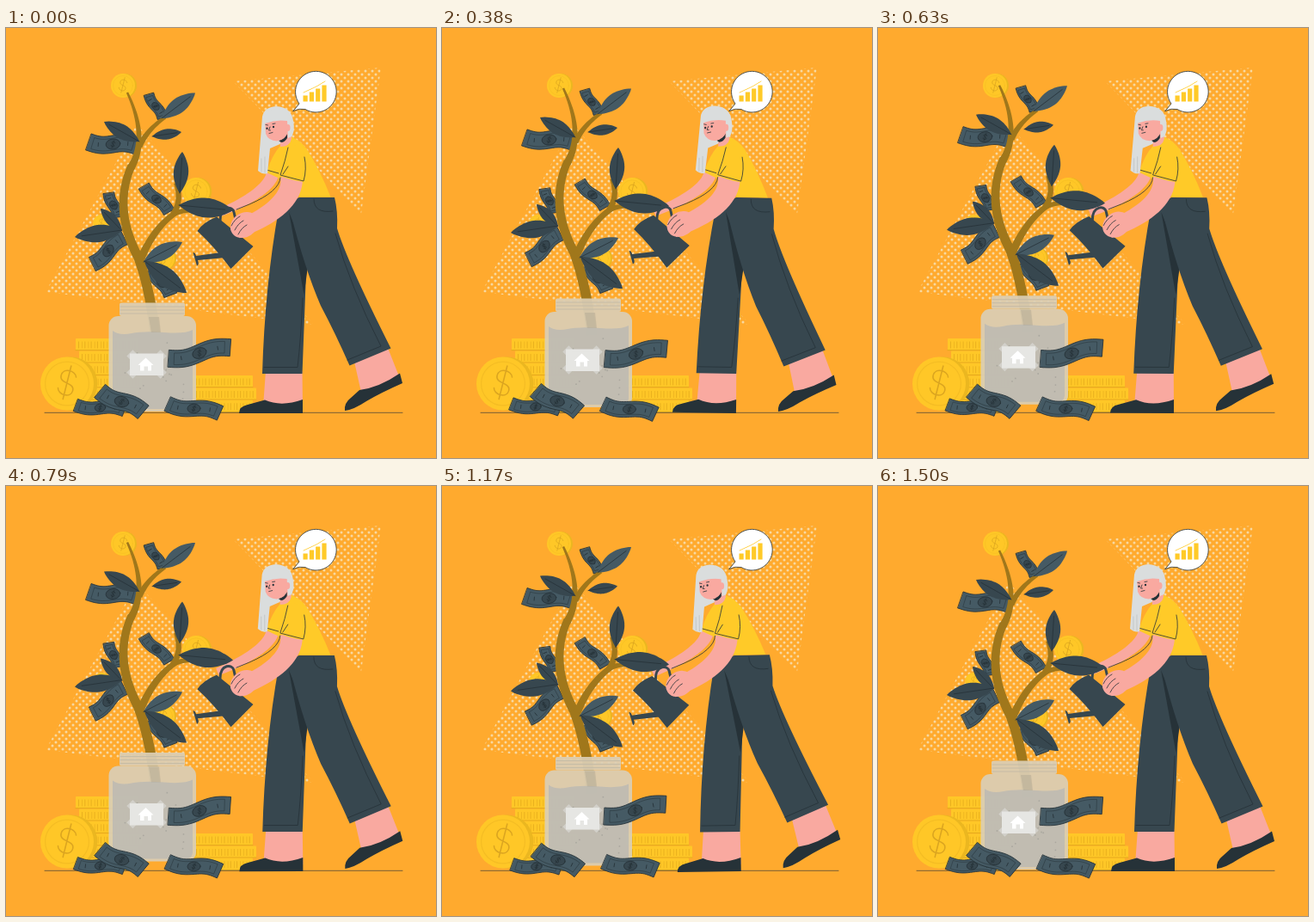
An HTML page that plays this animation: 500 by 500 pixels, repeating every 1540 ms.

```html
<!DOCTYPE html>
<html lang="en">
<head>
<meta charset="utf-8">
<title>Money tree</title>
<style>
html, body { margin: 0; width: 100%; height: 100%; overflow: hidden; background: #ffaa2e; }
svg { display: block; width: 100vw; height: 100vh; }
.pink { fill: #f9a9a0; }
.yellow { fill: #ffca28; }
.slate { fill: #37474f; }
.ink { fill: #263238; }
.hair { fill: #dadddd; }
.line { stroke: #263238; stroke-width: .8; }
</style>
</head>
<body>
<svg viewBox="0 0 500 500" fill="none" stroke-linecap="round" stroke-linejoin="round">
  <defs>
    <pattern id="dots" width="8" height="8" patternUnits="userSpaceOnUse">
      <g fill="#f8d8a0"><circle cx="2" cy="2" r="1.5"/><circle cx="6" cy="6" r="1.5"/></g>
    </pattern>
  </defs>
  <path fill="url(#dots)" d="M264 62L436 46L413 216ZM152 112L46 307L358 345Z"/>
  <g id="coins"></g>
  <path class="line" d="M45 447.300H461" opacity=".8"/>

  <g id="bubble">
    <path d="M334 96.500L341 88A23.800 23.800 0 1 1 348 94.500Q341 93 334 96.500Z" fill="#fff" class="line"/>
    <path d="M346 75L361 68L371 62" stroke="#ffca28" stroke-width=".8"/>
  </g>

  <g id="woman">
    <g id="backArm"></g>
    <!-- watering can -->
    <path class="slate" d="M217.500 261Q220 261 221 265L250 261L255 267L223 270Q225 275 222 276.500Z"/>
    <path stroke="#37474f" stroke-width="3" d="M249 224C249 206 264 207 265 214T270 236"/>
    <path class="slate" d="M222.500 236Q229 226 245 219.500L287.500 254L261.500 280Q242 254 222.500 236Z"/>

    <!-- legs -->
    <path class="pink" d="M302 399H344.500L345 440H299ZM405 388L444 372L457 405L414 428Z"/>
    <path class="ink" d="M271 448Q271 440 281 438L301 432.500Q320 441 345 432V448ZM394 445Q393 436 401 430L411 421Q434 418 458 401.500L461 413Q436 424 419 434Q404 444 394 445Z"/>
    <path class="slate" d="M325 200H360L349 284L344.500 402H298Q301 300 317 211Z"/>
    <path class="ink" d="M329 214L352 270L346.500 310Q337 258 329 214Z"/>
    <path class="slate" d="M327 203L341 197H382Q386 213 385 233Q396 270 447.500 372.500L399.500 392.500Q383 355 366 323Q347 279 331 215Z"/>
    <path class="line" d="M300 394.500H339Q343 360 345 314M397 386L436 370Q400 300 383 239M358 199Q358 216 380 213"/>

    <!-- shirt -->
    <path class="yellow" d="M319 137L332 127Q342 130 350 141Q366 167 377.500 196.500H341L335 183L303 168Q309 148 319 137Z"/>
    <g id="frontArm"></g>
    <path class="yellow" d="M327 136Q341 133 347 147Q350 161 346 179Q330 177 319 172Z"/>
    <path class="line" d="M328 139Q325 154 319 171L346 178Q350 164 347 150M303 165L317 169M322 170L328 161"/>

    <!-- head -->
    <path class="hair" d="M298 103Q300 92 314 91Q332 92 334 108Q337 121 330 130L307 140L304 169Q299 171 293 166Z"/>
    <path class="pink" d="M318 116H330L332 129Q330 138 319 138Z"/>
    <path class="ink" d="M317 131Q325 128 327 123V128Q324 133 320 133Z"/>
    <path class="pink" d="M301 107H328V119Q326 130 315 131.500Q305 131 302 123Z"/>
    <path class="hair" d="M298 112Q299 94 315 94Q330 95 333 108L332 126L328 128L327 108Q314 106 301 111Z"/>
    <ellipse class="pink" cx="328" cy="116" rx="2.500" ry="4"/>
    <path class="line" d="M302 112.500L304.500 113M310 111.500L313 111M307 115L305.500 119H307.500M306 122.500L310 121.500"/>
    <path class="line" stroke-width="2.200" style="stroke-width:2.200" d="M303.500 116.500v.4M311 114.800v.4"/>
    <path stroke="#b9bebe" stroke-width=".7" d="M297 152V167M301 150V168"/>
  </g>

  <g id="plant">
    <g id="tree"></g>
    <g id="jar">
      <g fill="#dbcfb6" fill-opacity=".92">
        <rect x="132" y="319.500" width="76" height="15.500" rx="2"/>
        <rect x="119.500" y="335" width="101.500" height="111" rx="11"/>
      </g>
      <path fill="#bdbab3" fill-opacity=".85" d="M124 352Q132 358 146 355T184 354T217 351V436Q216 443 209 443H132Q124 443 124 436Z"/>
      <path fill="#9c9583" fill-opacity=".3" d="M166 336H178L180 354H169Z"/>
      <path stroke="#c5bba6" d="M133 324H207M133 328H207M133 332H207"/>
    </g>
  </g>
  <g id="cash"></g>
</svg>
<script>
const $ = id => document.getElementById(id);
const add = (id, markup) => $(id).insertAdjacentHTML('beforeend', markup);

const bend = (x0, y0, cx, cy, x1, y1) => t => {
  const s = 1 - t;
  return [s * s * x0 + 2 * s * t * cx + t * t * x1, s * s * y0 + 2 * s * t * cy + t * t * y1];
};

// Outline of a band that follows a curve with a varying width.
function ribbon(curve, width, from = 0, to = 1) {
  const one = [], two = [], n = 20;
  for (let i = 0; i <= n; i++) {
    const t = from + (to - from) * i / n;
    const [x, y] = curve(t), [ax, ay] = curve(t - .01), [bx, by] = curve(t + .01);
    const k = width(t) / 2 / Math.hypot(bx - ax, by - ay);
    const nx = (ay - by) * k, ny = (bx - ax) * k;
    one.push([x + nx, y + ny].map(v => v.toFixed(2)));
    two.unshift([x - nx, y - ny].map(v => v.toFixed(2)));
  }
  return `M${one.concat(two).join('L')}Z`;
}

const limb = (id, fill, curve, w0, w1) =>
  add(id, `<path fill="${fill}" d="${ribbon(curve, t => w0 + (w1 - w0) * t)}"/>`);

const dollar = (x, y, s, color, w) =>
  `<path transform="translate(${x} ${y}) rotate(14) scale(${s})" stroke="${color}" stroke-width="${w / s}"
    d="M7 -7C5 -13 -7 -13 -7 -5S7 -2 7 6S-6 13 -7 7M0 -16V16"/>`;

function coin(x, y, r) {
  add('coins', `<circle cx="${x + r * .14}" cy="${y}" r="${r}" fill="#ebb720"/>
    <circle cx="${x}" cy="${y}" r="${r}" fill="#ffc727"/>
    <circle cx="${x}" cy="${y}" r="${r * .82}" stroke="#f5bd24" stroke-width="${r / 25}"/>`
    + dollar(x, y - r * .04, r / 25, '#dba520', r / 20));
}

function stack(x, y, rows) {
  for (let i = 0; i < rows; i++) {
    const left = x + i % 2 * 4, top = y + i * 14.4;
    add('coins', `<rect x="${left}" y="${top}" width="73" height="14" rx="1" fill="#ffc727"/>
      <path d="M${left} ${top + 13.6}h73" stroke="#e3a91b"/>
      <path d="M${left + 3} ${top + 7.5}h67" stroke="#e8b01e" stroke-width="8" stroke-linecap="butt" stroke-dasharray="1 3.2 .7 2.4"/>`);
  }
}

function leaf(x, y, tx, ty, fill = '#37474f') {
  const len = Math.hypot(tx - x, ty - y);
  const rib = t => [x + (tx - x) * t, y + (ty - y) * t];
  add('tree', `<path fill="${fill}" d="${ribbon(rib, t => .36 * len * Math.sin(Math.PI * t) ** .85)}"/>
    <path class="line" d="M${rib(0)}L${rib(.85)}"/>`);
}

// Wavy banknote around its centre.
function note(id, x, y, deg, len, h) {
  const wave = t => [(t - .5) * len, len * .04 * Math.sin(2 * Math.PI * t)];
  add(id, `<g transform="translate(${x} ${y}) rotate(${deg})">
    <path fill="#455a64" class="line" d="${ribbon(wave, () => h)}"/>
    <path class="line" opacity=".6" d="${ribbon(wave, () => h * .68, .09, .91)}"/>
    <ellipse class="slate line" rx="${h * .42}" ry="${h * .3}" transform="rotate(-12)"/>
    ${dollar(0, 0, h / 75, '#263238', .8)}
    <path class="line" d="M${-len * .3} 0v4M${len * .3} -4v4"/></g>`);
}

[[136, 67, 14], [221, 190, 16], [111, 227, 10], [182, 268, 14]].forEach(c => coin(...c));
stack(81, 361, 6);
stack(214, 404, 3);
coin(71, 413.5, 31);

for (let i = 0; i < 4; i++) {
  const h = 7 + i * 4;
  add('bubble', `<rect class="yellow" x="${345.5 + i * 7.3}" y="${85.5 - h}" width="5.2" height="${h}"/>`);
}

limb('backArm', '#f9a9a0', bend(310, 170, 304, 192, 246, 216), 15, 9);
limb('frontArm', '#f9a9a0', bend(332, 172, 336, 208, 268, 235), 26, 20);
add('frontArm', `<ellipse class="pink" cx="277" cy="229" rx="17" ry="14" transform="rotate(-35 277 229)"/>
  <path class="line" d="M319 174Q318 190 283 205L268 211"/>`);
for (let i = 0; i < 3; i++)
  add('frontArm', `<path class="line" d="M${262 + i * 4} ${230 + i * 5}q4 -8 10 -11"/>`);

[[124.5, 135, 5, 57, 20], [174, 91, 60, 32, 12], [125, 206, 68, 30, 13], [175, 199, 46, 42, 14],
 [119, 259, -40, 48, 18], [181, 296, 55, 36, 16]].forEach(n => note('tree', ...n));

const bark = '#a0771b';
limb('tree', bark, bend(174, 362, 168, 302, 152, 262), 12, 11);
limb('tree', bark, bend(153, 265, 124, 210, 146, 160), 11, 9);
limb('tree', bark, bend(145, 163, 166, 128, 141, 75), 9, 2.5);
limb('tree', bark, bend(155, 138, 164, 118, 185, 104), 7, 4);
limb('tree', bark, bend(157, 268, 174, 228, 202, 212), 9, 6);
limb('tree', bark, bend(195, 216, 212, 209, 234, 214), 6, 4);
limb('tree', bark, bend(194, 217, 205, 202, 198, 180), 7, 6);

const pale = '#455a64';
leaf(181, 105, 220, 75.5, pale);
leaf(170, 126, 204, 121);
leaf(155, 132, 114, 109);
leaf(202, 192, 205, 144);
leaf(135, 236, 110, 210);
leaf(135, 235, 80, 243);
leaf(160, 272, 205, 249, pale);
leaf(161, 271, 210, 308);
leaf(201, 206, 264, 212);

let seed = 7;
const rnd = () => (seed = seed * 16807 % 2147483647) / 2147483647;
for (let i = 0; i < 16; i++)
  add('jar', `<circle cx="${128 + rnd() * 85}" cy="${362 + rnd() * 76}" r=".9" fill="#aaa79f"/>`);

for (const x of [146, 181]) for (const y of [380, 402])
  add('jar', `<rect x="${x - 5}" y="${y - 3}" width="10" height="6" fill="#d2d0ca"
    transform="rotate(${(x < 160) === (y < 390) ? -45 : 45} ${x} ${y})"/>`);
add('jar', `<rect x="144" y="378.500" width="39" height="25.500" fill="#e6e6e3"/>
  <path fill="#fff" d="M153.500 392L162.500 383.500L171.500 392H169V398.500H165V393.500H160.500V398.500H156V392Z"/>`);

[[109.5, 441.5, 6, 57, 15], [134.5, 434.5, 26, 56, 20], [218.5, 442.5, 10, 62, 18], [225, 378, -10, 73, 20]]
  .forEach(n => note('cash', ...n));

const LOOP = 1540, STEP = 1000 / 24, STEPS = 36;

function draw(ms) {
  const p = Math.floor((ms % LOOP + 5) / STEP) % STEPS / STEPS;
  const rise = 10 * (1 - Math.abs(2 * p - 1));
  const sway = p < .25 ? 4 * p : p < .75 ? 2 - 4 * p : 4 * p - 4;
  $('plant').setAttribute('transform', `translate(0 ${-rise})`);
  $('woman').setAttribute('transform', `rotate(${sway} 339 270)`);
  $('cash').setAttribute('transform', `rotate(${sway} 170 409)`);
}

let start;
function tick(now) {
  start ??= now;
  draw(now - start);
  requestAnimationFrame(tick);
}
draw(0);
requestAnimationFrame(tick);
</script>
</body>
</html>
```
